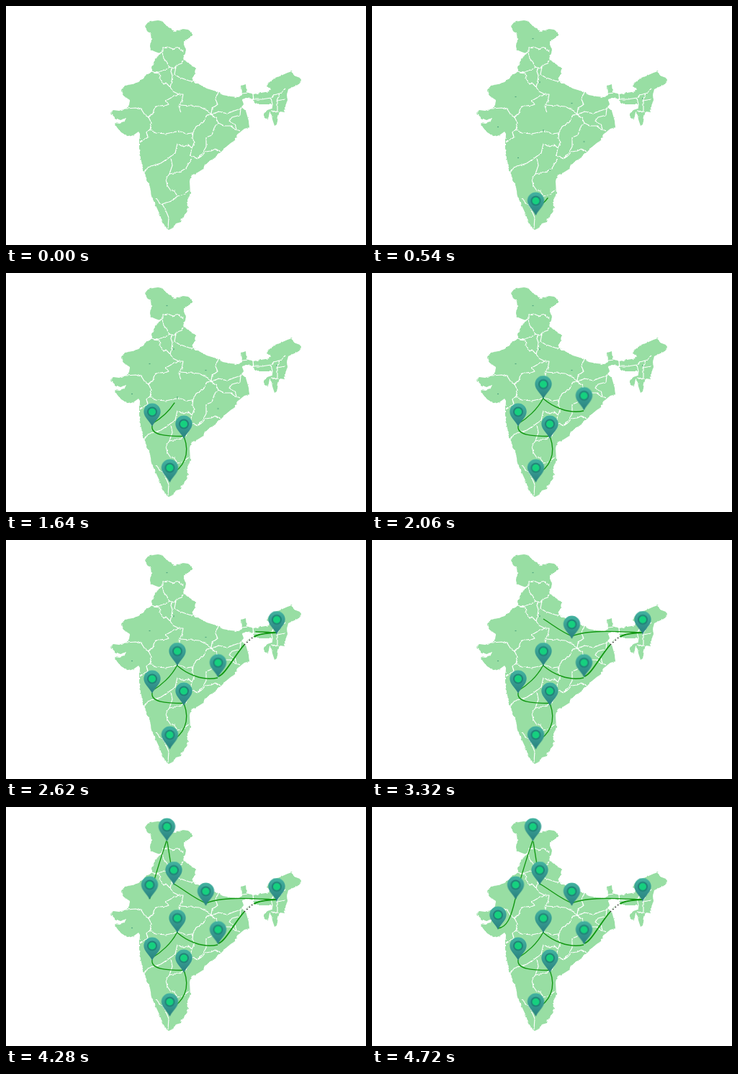
Write an HTML page that moves like this. It is 500 px wide and 333 px high and loops after 5940 ms.

```html
<!DOCTYPE html>
<html lang="en">
<head>
<meta charset="utf-8">
<title>Route across the map</title>
<style>
  html, body { margin: 0; width: 100%; height: 100%; overflow: hidden; background: #fff; }
  svg { display: block; width: 100%; height: 100%; }
  .land { fill: #98dea3; }
  .borders { fill: none; stroke: #fff; stroke-width: 1.15; stroke-linejoin: round; }
  .route { fill: none; stroke: #129812; stroke-dasharray: 1 2; stroke-dashoffset: 1; }
  .dot { fill: #2f8a70; }
  .gap path { fill: none; stroke: #fff; stroke-width: 2.8; }
  .gap path + path { stroke: #111; stroke-width: 1.2; stroke-dasharray: 1.5 3; }
</style>
</head>
<body>
<svg viewBox="0 0 500 333">
  <defs>
    <linearGradient id="teal" x2="0" y2="1">
      <stop offset="0" stop-color="#43b3a0"/>
      <stop offset="1" stop-color="#29807f"/>
    </linearGradient>
    <filter id="rough" filterUnits="userSpaceOnUse" x="0" y="0" width="500" height="333" color-interpolation-filters="sRGB">
      <feTurbulence type="fractalNoise" baseFrequency=".2" numOctaves="2" seed="4"/>
      <feDisplacementMap in="SourceGraphic" scale="3" xChannelSelector="R" yChannelSelector="G"/>
    </filter>
    <g id="pin">
      <path d="M0 0C-3-7-11.7-13-11.7-20.7A11.7 11.7 0 0 1 11.7-20.7C11.7-13 3-7 0 0Z" fill="url(#teal)"/>
      <circle cy="-20.5" r="7" fill="#218478"/>
      <circle cy="-20.5" r="5" fill="#16d07f"/>
    </g>
  </defs>

  <g filter="url(#rough)">
    <g class="land">
      <!-- north -->
      <path d="M193 28L197 23 204 21 211 20 217 21 222 27 229 31 235 36 240 34 246 32 253 33 258 37 258 42 252 46 247 50 247 55 250 60 249 66 246 73 251 78 257 82 263 87 262 94 258 102 264 107 264 130 190 130 190 101 195 96 203 91 202 85 206 78 210 70 214 66 208 64 201 61 200 55 202 47 201 39 196 35Z"/>
      <!-- west -->
      <path d="M195 96L190 101 184 106 175 109 165 111 160 118 163 125 172 131 171 138 167 143 157 146 149 145 145 149 152 156 159 159 167 156 164 162 157 164 151 163 154 169 160 176 170 182 177 180 184 175 186 178 185 198 250 198 250 96Z"/>
      <!-- east -->
      <path d="M245 98L258 102 264 107 272 111 279 115 289 118 295 120 301 124 312 126 322 127 328 124 327 111 333 109 334 120 343 123 343 129 334 128 328 130 330 137 327 141 333 146 335 153 337 160 338 169 331 171 326 175 321 179 318 187 312 191 306 196 299 203 291 210 283 216 276 221 274 227 266 232 245 232Z"/>
      <!-- south -->
      <path d="M185 185L185 198 187 212 190 225 195 240 200 252 202 265 208 278 213 289 217 299 221 308 226 312 232 309 236 303 243 301 244 297 249 290 253 280 252 270 256 262 255 244 257 236 266 232 280 185Z"/>
      <!-- north-east -->
      <path d="M343 123L354 121 366 119 368 116 361 111 366 106 374 100 382 97 391 93 397 91 400 97 408 100 410 104 405 110 398 113 392 116 390 124 391 130 388 140 387 147 380 146 378 154 376 165 373 167 370 158 369 152 366 148 364 158 359 156 358 150 363 145 369 143 369 137 352 137 345 135 343 129Z"/>
    </g>
    <g class="borders">
      <path d="M213 66L218 63 218 58 225 57 232 60 240 58 247 64M217 65L219 73 224 79 227 85 233 87 238 82 244 80 247 75M202 91L210 93 217 90 226 87 227 83M205 93L213 94 214 101 219 109 222 107 228 113 230 105 231 97 229 91 231 86M236 85L234 95 240 99 248 102 257 105 262 103"/>
      <path d="M228 113L232 119 240 123 246 123 244 134 240 139 243 148M240 123L229 128 222 132 226 137 218 140 212 138 206 142 204 150 198 155M167 143L180 142 188 144 193 152 198 155 202 163 200 172 195 176 197 183 186 190M200 172L208 177 222 178 232 176 240 174 250 178 259 177M242 138L255 139 268 140 280 146 285 151"/>
      <path d="M285 151L279 152 274 162 264 168 260 176 259 184 262 190 258 198M285 151L286 143 294 137 291 130 295 120M285 151L296 147 307 150 317 146 326 143 330 139M285 151L292 157 295 163 289 170 286 180 278 183 278 196 273 205 266 213M295 163L303 167 312 167 318 172 325 174M326 143L325 152 314 155 310 160 318 165 320 172M266 213L272 209 277 203 285 202 291 199 298 203M328 122L336 121"/>
      <path d="M266 213L256 208 258 198 253 193 247 196 238 192 235 205 224 213 215 219 205 222 197 225 192 232M229 212L231 222 227 234 222 241 224 250 228 256 234 258 238 265 230 272 222 274 215 277 209 268M227 234L240 232 250 226 257 214M238 265L247 262 255 256M217 276L222 285 226 295 225 310"/>
      <path d="M343 122L344 130 355 130 368 128 372 124 380 122 388 115M368 128L370 137 369 143M380 122L376 132 388 130M377 132L377 146M368 146L378 147M343 122L344 136"/>
    </g>
  </g>
  <g id="routes"></g>
  <g class="gap" id="gap"><path d="M331 146L344 134.5"/><path d="M331 146L344 134.5"/></g>
  <g id="pins"></g>
</svg>
<script>
const LOOP = 5940;
const POP = 80;

// Each stop: pin tip, time the pin is full, and the route leading to it.
const stops = [
  { at: [227.5, 292], full: 200 },
  { at: [247, 231], full: 780, from: 430, path: 'M227.5 281C247 272 256 252 247.5 229' },
  { at: [203, 214], full: 1420, from: 980, path: 'M247 227.5C222 227.5 201 226 203 213' },
  { at: [238, 175.5], full: 1720, from: 1420, path: 'M203 210C215 203 230 190 238 174' },
  { at: [294.5, 191.5], full: 2040, from: 1740, path: 'M238 175C250 186 273 197 294 192' },
  { at: [376, 131.5], full: 2520, from: 2080, width: 1.9, path: 'M295 190C304 188 317 162 330 147S352 130 376 129' },
  { at: [277.5, 138], full: 2940, from: 2500, path: 'M376 129C350 128 300 124 278 134' },
  { at: [233, 108.5], full: 3400, from: 3000, path: 'M278 134C262 128 250 117 233 107' },
  { at: [223.5, 48], full: 3840, from: 3620, path: 'M233 106L224 48' },
  { at: [199.5, 129], full: 4260, from: 3860, path: 'M223 47C218 63 207 93 199.5 128' },
  { at: [175, 171], full: 4720, from: 4280, path: 'M199 128C193 155 187 168 175 169' }
];

function add(parent, tag, attrs) {
  const node = document.createElementNS('http://www.w3.org/2000/svg', tag);
  for (const key in attrs) node.setAttribute(key, attrs[key]);
  return parent.appendChild(node);
}

// Change one property between two times, holding its value before and after.
function tween(node, prop, [a, b], start, end, easing = 'linear') {
  node.animate([
    { [prop]: a, offset: 0 },
    { [prop]: a, offset: start / LOOP, easing },
    { [prop]: b, offset: end / LOOP },
    { [prop]: b, offset: 1 }
  ], { duration: LOOP, iterations: Infinity });
}

const routes = document.getElementById('routes');
const pins = document.getElementById('pins');

for (const { at: [x, y], full, from, path, width = 1.35 } of stops) {
  const group = add(pins, 'g', { transform: `translate(${x} ${y})` });
  const dot = add(group, 'circle', { class: 'dot', cy: -2.5, r: .75 });
  tween(dot, 'opacity', [0, 1], 20, 21);

  const pin = add(group, 'use', { href: '#pin' });
  const popStart = path ? full - POP : 20;
  tween(pin, 'transform', ['scale(0)', 'scale(1)'], popStart, full, 'ease-out');

  if (path) {
    const route = add(routes, 'path', { class: 'route', d: path, pathLength: 1, 'stroke-width': width });
    tween(route, 'strokeDashoffset', ['1', '0'], from, full - POP / 2);
  }
}

tween(document.getElementById('gap'), 'opacity', [0, 1], 2320, 2321);
</script>
</body>
</html>
```
